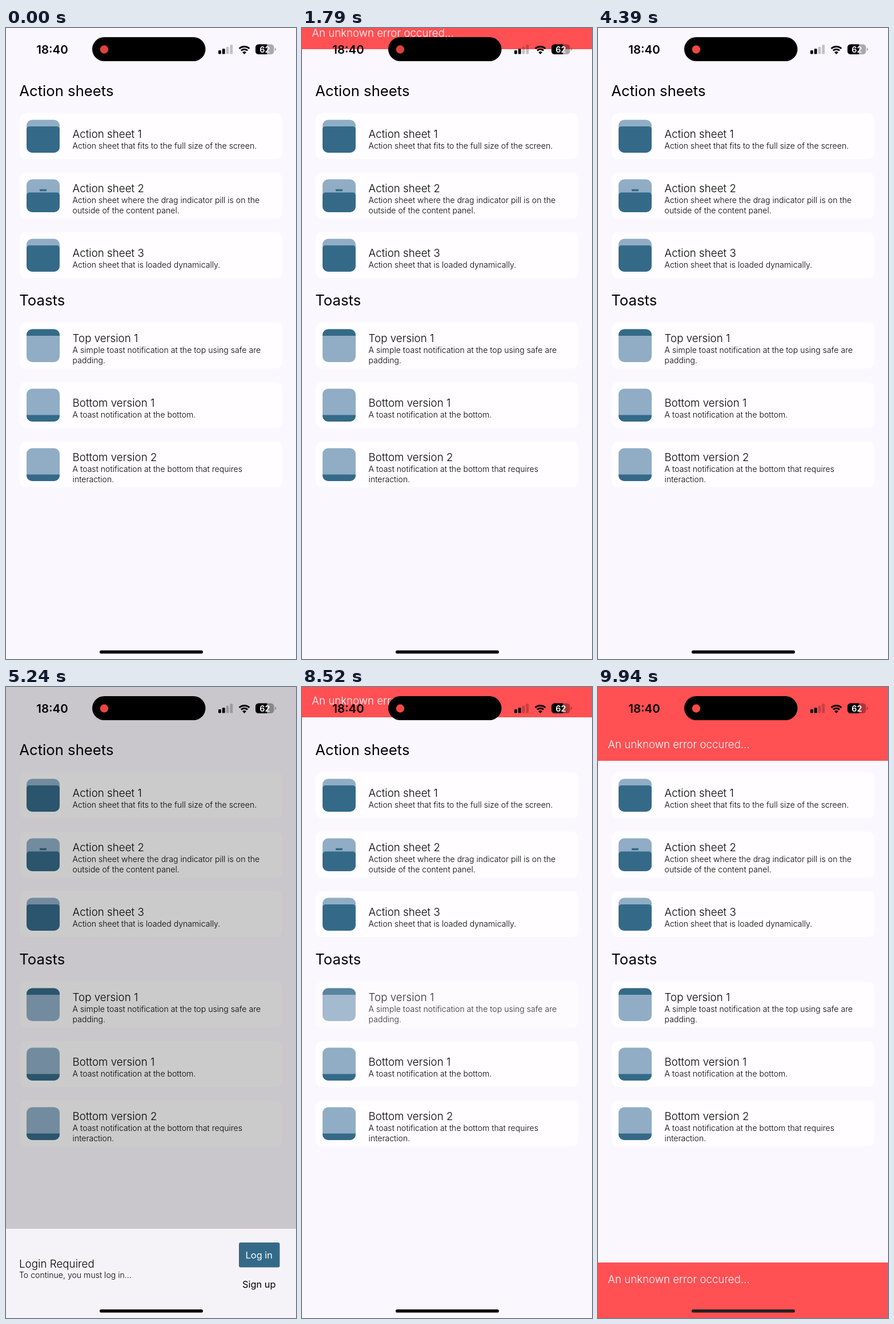
An HTML page for the animation above (10 s loop, 508 px wide and 1103 px high).

```html
<!DOCTYPE html>
<html lang="en">
<head>
<meta charset="utf-8">
<title>Sheets and toasts</title>
<style>
  html, body { margin: 0; width: 100%; height: 100%; overflow: hidden; background: #fbf7ff; }
  svg { display: block; width: 508px; height: 1103px; font-family: Inter, "Open Sans", sans-serif; }
  .heading { font-size: 25.7px; }
  .title { font-size: 18.8px; font-weight: 300; }
  .note { font-size: 14.1px; font-weight: 300; }
  .alert { font-size: 18.7px; font-weight: 300; fill: #fff; }
  .action { font-size: 16.4px; text-anchor: middle; }
  .clock { font-size: 20.5px; font-weight: 600; }
  .charge { font-size: 14.5px; font-weight: 600; fill: #fff; text-anchor: middle; }
  .card { fill: #fffdff; }
  .light { fill: #90adc5; }
  .dark { fill: #346a88; }
  .red { fill: #ff5053; }

  .top, .bottom, .sheet, .scrim, .home {
    animation: 10s cubic-bezier(.33, 1, .68, 1) infinite;
  }
  .top { animation-name: top; }
  .bottom { animation-name: bottom; }
  .home { animation-name: home; }
  .sheet { animation-name: sheet; }
  .scrim { animation-name: scrim; }
  .press { animation: 10s ease-in-out infinite; }
  .press-top { animation-name: press-top; }
  .press-bottom { animation-name: press-bottom; }
  .press-sheet { animation-name: press-sheet; }
  .dot { fill: #ff4b47; animation: pulse 10s ease-in-out infinite; }

  @keyframes top {
    0%, 1.89%, 19.89%, 84.73% { transform: translateY(-129px); }
    4.89%, 16.89%, 87.73%, 100% { transform: none; }
  }
  @keyframes bottom {
    0%, 25.99%, 43.99%, 89.8% { transform: translateY(97px); }
    28.99%, 40.99%, 92.8%, 100% { transform: none; }
  }
  @keyframes home {
    0%, 25.99%, 43.99%, 89.8% { fill: #000; }
    28.99%, 40.99%, 92.8%, 100% { fill: #242022; }
  }
  @keyframes sheet {
    0%, 47%, 73.9%, 100% { transform: translateY(156px); }
    50%, 70.9% { transform: none; }
  }
  @keyframes scrim {
    0%, 47%, 73.9%, 100% { opacity: 0; }
    50%, 70.9% { opacity: .2; }
  }
  @keyframes press-top {
    0%, .4%, 3%, 83.2%, 85.83%, 100% { opacity: 1; }
    1.3%, 84.1% { opacity: .3; }
  }
  @keyframes press-bottom {
    0%, 24.5%, 27.1%, 88.3%, 90.9%, 100% { opacity: 1; }
    25.4%, 89.2% { opacity: .3; }
  }
  @keyframes press-sheet {
    0%, 45.5%, 48.1%, 100% { opacity: 1; }
    46.4% { opacity: .3; }
  }
  @keyframes pulse {
    0%, 2.4%, 17.9%, 33.4%, 48.9%, 64.4%, 79.9% { opacity: .88; }
    10.2%, 25.7%, 41.2%, 56.7%, 72.2%, 87.7%, 100% { opacity: 1; }
  }
</style>
</head>
<body>
<svg viewBox="0 0 508 1103">
  <defs>
    <clipPath id="tile"><rect x="36" y="11.5" width="58" height="57.5" rx="10"/></clipPath>
    <clipPath id="cell"><rect x="437" y="28.5" width="32.5" height="17.5" rx="5.5"/></clipPath>
  </defs>
  <rect width="508" height="1103" fill="#fbf7ff"/>

  <text class="heading" x="23.3" y="119">Action sheets</text>
  <text class="heading" x="23.3" y="485">Toasts</text>
  <g id="cards"></g>

  <rect class="scrim" width="508" height="1103"/>

  <g class="sheet">
    <rect y="947" width="508" height="156" fill="#f5f3f8"/>
    <text class="title" x="23" y="1014.5">Login Required</text>
    <text class="note" x="23" y="1033">To continue, you must log in...</text>
    <rect class="dark" x="408" y="971" width="71.5" height="43.5" rx="3"/>
    <text class="action" x="443.3" y="999" fill="#fff">Log in</text>
    <text class="action" x="443.3" y="1049.5">Sign up</text>
  </g>

  <g class="top">
    <rect class="red" width="508" height="129"/>
    <text class="alert" x="17.3" y="107">An unknown error occured...</text>
  </g>
  <g class="bottom">
    <rect class="red" y="1006" width="508" height="97"/>
    <text class="alert" x="17.3" y="1041.5">An unknown error occured...</text>
  </g>

  <!-- status bar -->
  <text class="clock" x="53.3" y="45.3">18:40</text>
  <rect x="151" y="16" width="198.5" height="42" rx="21"/>
  <circle class="dot" cx="172" cy="37.5" r="7.2"/>
  <rect x="372" y="39" width="4.8" height="6.5" rx="1.3"/>
  <rect x="378.8" y="36.3" width="4.8" height="9.2" rx="1.3"/>
  <g opacity=".22">
    <rect x="385.6" y="32.8" width="4.8" height="12.7" rx="1.3"/>
    <rect x="392.4" y="29.3" width="4.8" height="16.2" rx="1.3"/>
  </g>
  <path d="M408.6 36a13 13 0 0 1 17.8 0M411.9 39.5a8.2 8.2 0 0 1 11.2 0" fill="none" stroke="#000" stroke-width="3"/>
  <path d="M417.5 46l-3.4-3.6a4.9 4.9 0 0 1 6.8 0z"/>
  <g clip-path="url(#cell)">
    <rect x="437" y="28" width="33" height="18" opacity=".32"/>
    <rect x="437" y="28" width="20.2" height="18"/>
  </g>
  <path d="M471 34.5q2.2 .6 2.2 2.8t-2.2 2.8z" opacity=".32"/>
  <text class="charge" x="453.3" y="42.5">62</text>

  <rect class="home" x="164" y="1088" width="181" height="5.6" rx="2.8"/>
</svg>
<script>
  // Tile art, measured from the top of its card
  const art = {
    full: '<rect class="dark" x="36" y="23" width="58" height="60" rx="5"/>',
    half: '<rect class="dark" x="36" y="34.5" width="58" height="60" rx="5"/>' +
          '<rect class="dark" x="59" y="28.7" width="12" height="3.5" rx=".8"/>',
    top: '<rect class="dark" x="36" y="11" width="58" height="12"/>',
    bottom: '<rect class="dark" x="36" y="57.5" width="58" height="12"/>'
  };

  const cards = [
    [149, 'full', '', 'Action sheet 1', 'Action sheet that fits to the full size of the screen.'],
    [253, 'half', '', 'Action sheet 2', 'Action sheet where the drag indicator pill is on the', 'outside of the content panel.'],
    [357, 'full', '', 'Action sheet 3', 'Action sheet that is loaded dynamically.'],
    [515, 'top', 'press press-top', 'Top version 1', 'A simple toast notification at the top using safe are', 'padding.'],
    [619, 'bottom', 'press press-bottom', 'Bottom version 1', 'A toast notification at the bottom.'],
    [723, 'bottom', 'press press-sheet', 'Bottom version 2', 'A toast notification at the bottom that requires', 'interaction.']
  ];

  const drawCard = ([y, kind, press, title, ...notes]) => {
    const base = notes.length > 1 ? 34 : 43;
    const lines = notes.map((note, i) =>
      `<text class="note" x="116.6" y="${base + 18.5 * (i + 1)}">${note}</text>`).join('');
    return `<g transform="translate(0 ${y})"><g class="${press}">
      <rect class="card" x="24" width="460" height="80" rx="10"/>
      <g clip-path="url(#tile)"><rect class="light" x="36" y="11" width="58" height="59"/>${art[kind]}</g>
      <text class="title" x="116.6" y="${base}">${title}</text>${lines}</g></g>`;
  };

  document.getElementById('cards').innerHTML = cards.map(drawCard).join('');
</script>
</body>
</html>
```
